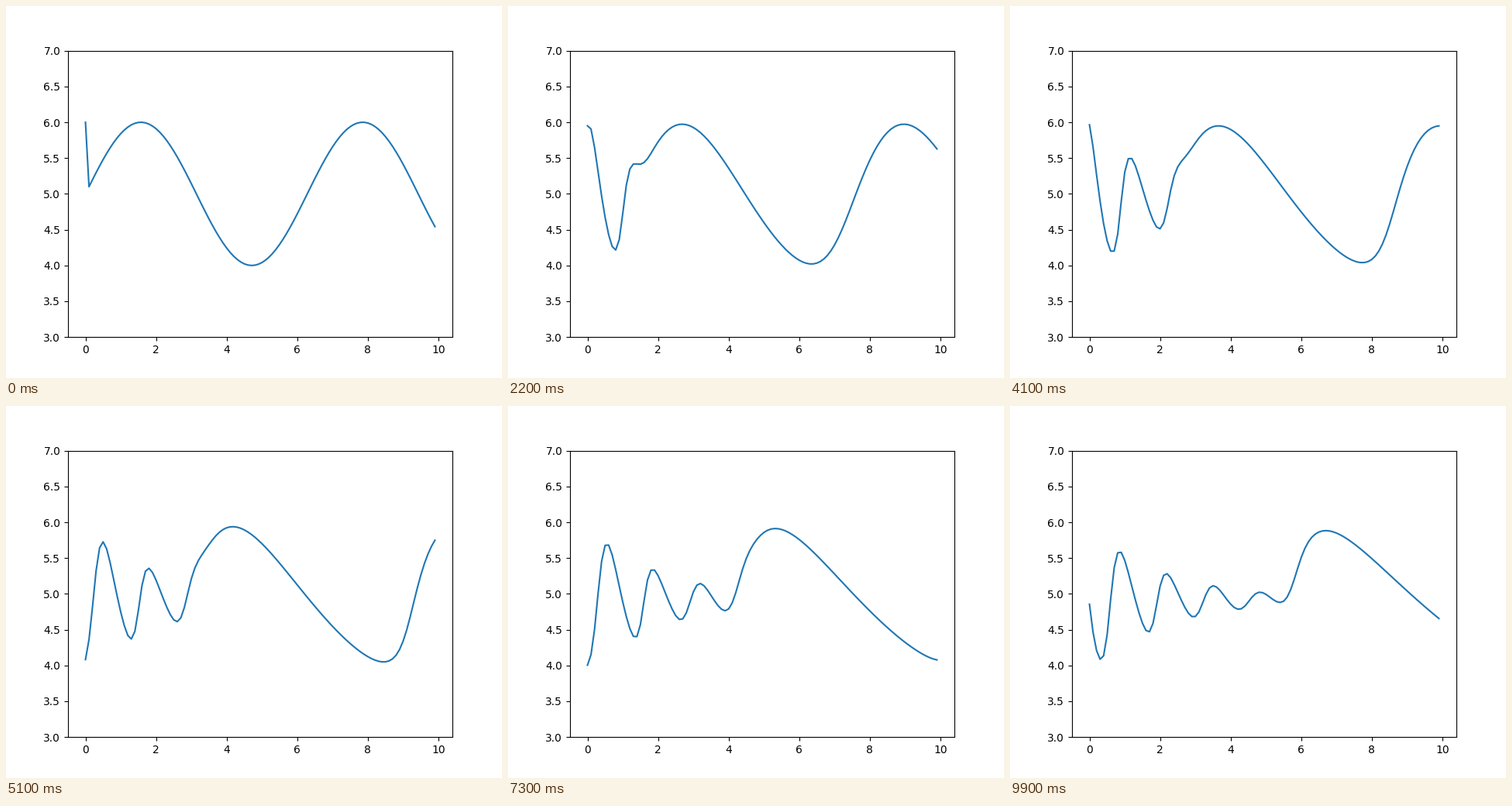
Recreate the animation shown at these times as a matplotlib script. Size 640x480 px, loop 10 s.

```python
import numpy as np
import matplotlib.pyplot as plt
from matplotlib.animation import FuncAnimation

FRAMES = 100
DX, DT = 0.1, 0.3

x = np.arange(0, 10, DX)


def step(u, t):
    """Advance u_t + u_x / u = 0, tracing each characteristic back to its foot."""
    new = u.copy()
    jump = np.diff(u)
    new[1:] = (u[1:] + np.sqrt(u[1:] ** 2 - 4 * DT / DX * jump)) / 2
    new[0] = 5 + np.cos(t)
    return new


def solve():
    u = 5 + np.sin(x)
    u[0] = 6
    waves = [u]
    for n in range(1, FRAMES):
        waves.append(step(waves[-1], n * DT))
    return waves


waves = solve()

fig, ax = plt.subplots(figsize=(6.4, 4.8), dpi=100)
line, = ax.plot(x, waves[0])
ax.set_ylim(3, 7)


def update(n):
    line.set_ydata(waves[n])
    return line,


anim = FuncAnimation(fig, update, frames=FRAMES, interval=100,
                     repeat=True, repeat_delay=0)
plt.show()
```
